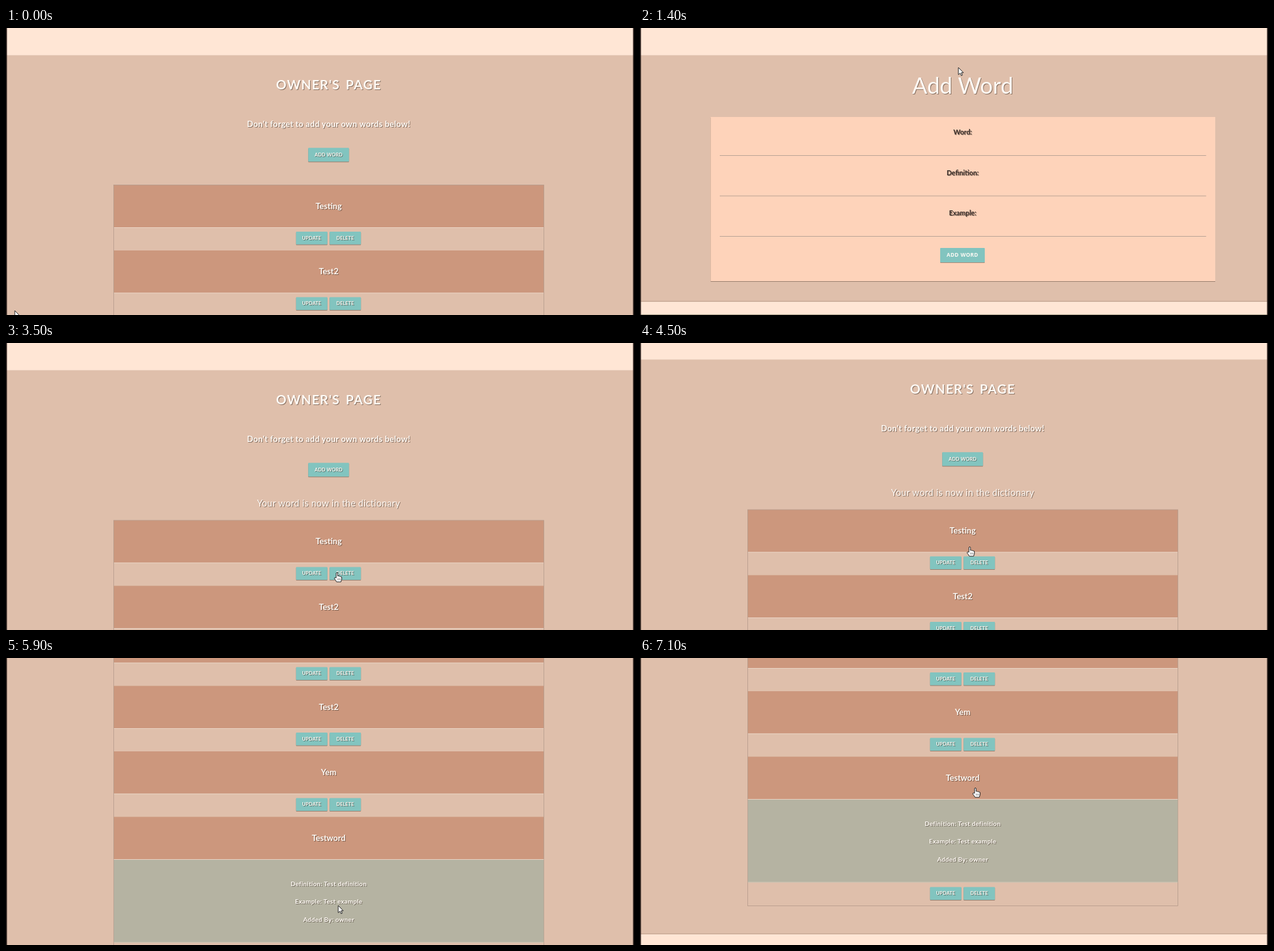
Animation of 1000x458 px, one loop 7200 ms. Source, as an HTML page:

```html
<!DOCTYPE html>
<html lang="en">
<head>
<meta charset="utf-8">
<title>Dictionary</title>
<style>
  html, body { margin: 0; width: 100%; height: 100%; overflow: hidden; background: #dfbfab; }
  svg { display: block; width: 100%; height: 100%; }
  text { font-family: Lato, "Open Sans", sans-serif; font-weight: 700; fill: #fffaf5; text-anchor: middle;
         filter: drop-shadow(1.5px 1.5px .7px rgba(50, 35, 25, .5)); }
  .title { font-size: 20.5px; letter-spacing: 1.1px; word-spacing: 3px; }
  .lead { font-size: 13px; letter-spacing: .3px; }
  .note { font-size: 14.5px; font-weight: 400; letter-spacing: .35px; }
  .word { font-size: 13px; }
  .detail { font-size: 10px; letter-spacing: .3px; }
  .button { font-size: 7.6px; letter-spacing: .15px; }
  .submit { font-family: "Open Sans", sans-serif; font-size: 8.5px; letter-spacing: .4px; filter: none; }
  .heading { font-size: 36px; font-weight: 400; }
  .label { font-size: 10.8px; fill: #3b302b; }
  .typed { font-size: 11px; font-weight: 400; fill: #3b302b; text-anchor: start; filter: none; }
  .raised { filter: drop-shadow(0 1px .6px rgba(70, 50, 40, .45)); }
</style>
</head>
<body>
<svg id="stage" viewBox="0 0 1000 458" preserveAspectRatio="none"></svg>
<script>
const LOOP = 7200, STEP = 100;
const CENTER = 513.8, LEFT = 171.5, WIDTH = 685;
const HEAD = 67.5, PERIOD = 104.5, DETAIL = 133.5;
const LIST_TOP = 250.5, NOTED_TOP = 283;

// Keyframes: [time, value, ...]
const cursorKeys = [
  [0, 14, 451], [800, 513, 200], [1000, 513, 200], [1400, 507, 63], [1600, 502, 10],
  [2400, 502, 10], [2500, 502, 13], [3100, 515, 358], [3300, 527, 366], [3500, 527, 366],
  [3800, 529, 262], [4200, 525, 325], [4500, 525, 325], [5100, 526, 337], [5400, 528, 291],
  [5500, 528, 291], [5900, 529, 395], [6300, 529, 395], [7100, 534, 207]
];
const scrollKeys = [[0, 0], [4200, 0], [4500, 17], [5100, 188], [5400, 343], [5900, 343], [6300, 439]];
const detailKeys = [[0, 0], [5500, 0], [5800, DETAIL]];

const rect = (x, y, w, h, fill, extra = '') =>
  `<rect x="${x}" y="${y}" width="${w}" height="${h}" fill="${fill}" ${extra}/>`;
const text = (cls, y, label, x = CENTER) => `<text class="${cls}" x="${x}" y="${y}">${label}</text>`;
const button = (x, y, w, h, label, cls = 'button') =>
  rect(x, y, w, h, '#82c4bf', 'rx="1" class="raised"') + text(cls, y + h / 2 + 2.6, label, x + w / 2);
const rule = (y, color) => rect(LEFT, y, WIDTH, 1, color);

const header = (y, word) =>
  rect(LEFT, y, WIDTH, HEAD, '#cc977d') + rule(y + HEAD, '#ead3c4') + text('word', y + 38, word);
const actions = y =>
  button(461.8, y + 7, 50, 20.5, 'UPDATE') + button(515.2, y + 7, 50, 20.5, 'DELETE');
const footer = y => rect(0, y, 1000, 300, '#ffe6d5') + rect(0, y - 1, 1000, 1.5, '#c9ab98');
const topBand = rect(0, -10, 1000, 53.5, '#ffe6d5') + rect(0, 43, 1000, 1, '#eacfbd');

const intro = topBand + text('title', 98, 'OWNER\'S PAGE')
  + text('lead', 157.8, 'Don\'t forget to add your own words below!')
  + button(481.2, 191.3, 65, 22, 'ADD WORD');

function wordList(top, words) {
  return words.map((word, i) => {
    const y = top + i * PERIOD, last = i === words.length - 1;
    const row = actions(y + HEAD);
    return header(y, word) + (last ? `<g class="tail">${row}${footer(y + PERIOD + 45)}</g>` : row);
  }).join('') + rect(LEFT, top, WIDTH, words.length * PERIOD, 'none', 'class="frame" stroke="#b39a8a" stroke-width=".8"');
}

const detailTop = NOTED_TOP + 3 * PERIOD + HEAD;
const detailPanel = `<clipPath id="open"><rect x="${LEFT}" y="${detailTop}" width="${WIDTH}" height="0"/></clipPath>
  <g clip-path="url(#open)">${rect(LEFT, detailTop, WIDTH, DETAIL, '#b5b3a2')}
  ${rule(detailTop, '#ead3c4')}${rule(detailTop + DETAIL - 1, '#d9cdbd')}
  ${['Definition: Test definition', 'Example: Test example', 'Added By: owner']
    .map((line, i) => text('detail', detailTop + 43 + i * 28.3, line)).join('')}</g>`;

const fields = [['Word:', 'Testword'], ['Definition:', 'Test definition'], ['Example:', 'Test example']];
const form = topBand + text('heading', 105, 'Add Word')
  + rect(112.5, 142, 803.5, 262, '#fed3ba', 'class="raised"')
  + fields.map(([label, value], i) => {
      const y = 170 + i * 64.5;
      return text('label', y, label) + text('typed', y + 25, value, 128)
        + rect(127, y + 33, 774.5, 1, '#b9a396');
    }).join('')
  + button(478, 351, 71, 23, 'ADD WORD', 'submit')
  + footer(436.5) + rect(0, 457, 1000, 1, '#aaa18a');

const arrow = '<path d="M0 0V11.5L2.7 9L4.6 13L6.4 12.2L4.6 8.3H8Z" fill="#fff" stroke="#222" stroke-width="1"/>';
const hand = `<path d="M-1.2 9V1Q0 -.6 1.2 1V6Q2.5 5 3.5 6.4Q5 5.5 5.8 7Q7.4 6.4 7.6 8V11
  Q7 13 6.3 15.2H-.6Q-2 12.5 -4 10.2Q-4.3 8 -2.5 8.4Z" fill="#fff" stroke="#222" stroke-width="1"/>
  <path d="M1.4 9.5V12.5M3.4 9.5V12.5M5.4 9.5V12.5" stroke="#555" stroke-width=".7"/>`;

const stage = document.getElementById('stage');
stage.innerHTML = rect(0, 0, 1000, 458, '#dfbfab')
  + `<g id="before">${intro}${wordList(LIST_TOP, ['Testing', 'Test2', 'Yem'])}</g>`
  + `<g id="form">${form}</g>`
  + `<g id="after">${intro}${text('note', 261, 'Your word is now in the dictionary')}
     ${wordList(NOTED_TOP, ['Testing', 'Test2', 'Yem', 'Testword'])}${detailPanel}</g>`
  + rect(0, 0, 1.5, 458, '#211714') + rect(998.5, 0, 1.5, 458, '#211714')
  + `<g id="cursor"><g id="arrow">${arrow}</g><g id="hand">${hand}</g></g>`;

const find = selector => stage.querySelector(selector);
const show = (node, on) => node.setAttribute('display', on ? 'inline' : 'none');
const move = (node, x, y) => node.setAttribute('transform', `translate(${x} ${y})`);
const pages = ['before', 'form', 'after'].map(id => find('#' + id));
const typed = [...stage.querySelectorAll('.typed')];
const after = find('#after'), tail = find('#after .tail'), frame = find('#after .frame');
const clip = find('#open rect'), cursor = find('#cursor');
const arrowShape = find('#arrow'), handShape = find('#hand');

const linear = u => u;
const smooth = u => u * u * (3 - 2 * u);

function sample(keys, t, ease = linear) {
  const next = keys.findIndex(key => key[0] > t);
  if (next < 0) return keys[keys.length - 1].slice(1);
  const a = keys[next - 1], b = keys[next];
  const u = ease((t - a[0]) / (b[0] - a[0]));
  return a.slice(1).map((v, i) => v + (b[i + 1] - v) * u);
}

const inside = (x, y, left, top, w, h) => x >= left && x <= left + w && y >= top && y <= top + h;

function isClickable(page, x, y) {
  if (page === 1) return inside(x, y, 478, 351, 71, 23);
  if (inside(x, y, 481, 191, 65.5, 22)) return true;
  const row = y - (page ? NOTED_TOP : LIST_TOP);
  if (row < 0 || row > (page ? 4 : 3) * PERIOD) return false;
  const local = row % PERIOD;
  return inside(x, local, LEFT, 0, WIDTH, HEAD)
    || inside(x, local, 461.5, HEAD + 7, 50.5, 21)
    || inside(x, local, 515, HEAD + 7, 50.5, 21);
}

function render(t) {
  const page = t < 900 ? 0 : t < 3200 ? 1 : 2;
  pages.forEach((node, i) => show(node, i === page));
  typed.forEach((node, i) => show(node, t >= 2000 + i * STEP));

  const [scroll] = sample(scrollKeys, t);
  const [open] = sample(detailKeys, t, smooth);
  move(after, 0, -scroll);
  move(tail, 0, open);
  clip.setAttribute('height', open);
  frame.setAttribute('height', 4 * PERIOD + open);

  const [x, y] = sample(cursorKeys, t, smooth);
  const pointing = isClickable(page, x, y + scroll) && !(open && y + scroll > detailTop);
  show(cursor, t < 1700 || t >= 2500);
  show(arrowShape, !pointing);
  show(handShape, pointing);
  move(cursor, x, y);
}

const start = performance.now();
function tick() {
  const t = (performance.now() - start) % LOOP;
  render(Math.floor(t / STEP) * STEP);
  requestAnimationFrame(tick);
}
tick();
</script>
</body>
</html>
```
